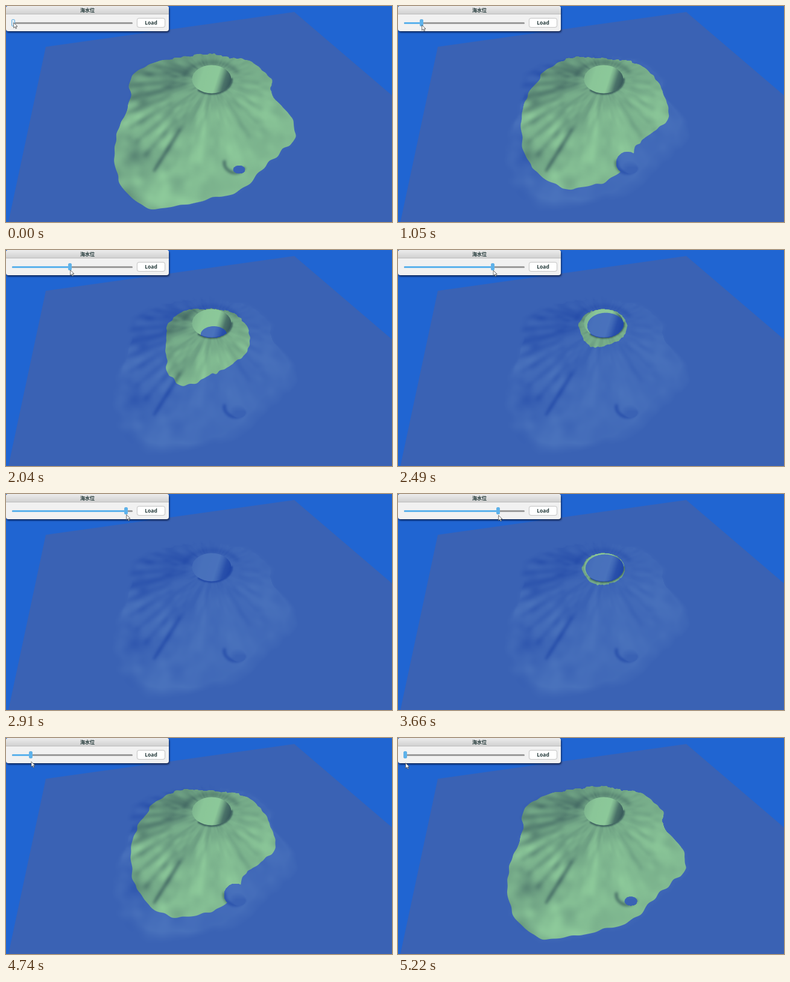
These frames come from a looping animation (640x360 px, 5.25 s). An HTML page with a canvas:

```html
<!DOCTYPE html>
<html lang="ja">
<head>
<meta charset="utf-8">
<style>
html, body { margin: 0; width: 100%; height: 100%; overflow: hidden; background: #2065d2; }
canvas, .panel, .cursor { position: absolute; left: 0; top: 0; }
.panel { width: 270px; height: 42px; border-radius: 4px; background: #f1f1f1; color: #223838;
  box-shadow: 1px 2px 3px rgba(0, 10, 40, .75); }
.title { height: 13px; border-radius: 4px 4px 0 0; border-bottom: 1px solid #bbb;
  background: linear-gradient(#ececec, #d2d2d2); text-align: center;
  font: bold 8px/14px "Noto Sans CJK JP", "Noto Sans CJK", sans-serif; }
.panel i { position: absolute; }
.track, .fill { left: 10px; top: 26.5px; height: 3px; border-radius: 2px; background: #9b9b9b; }
.track { width: 200px; }
.fill { background: #5cb2ec; }
.thumb { top: 22px; width: 6px; height: 12px; border-radius: 2px; box-sizing: border-box;
  border: 1px solid #69b3e4; }
.load { position: absolute; left: 218px; top: 21px; width: 45px; height: 14px; border-radius: 3px;
  text-align: center; background: #fff; box-shadow: 0 0 1px 1px #c4c4c4;
  font: bold 8.5px/14px "Open Sans", sans-serif; }
</style>
</head>
<body>
<canvas id="sea" width="640" height="360"></canvas>
<div class="panel">
  <div class="title">海水位</div>
  <i class="track"></i><i class="fill" id="fill"></i><i class="thumb" id="thumb"></i>
  <div class="load">Load</div>
</div>
<svg class="cursor" id="cursor" width="10" height="14">
  <path d="M.7 .8V9.5L2.8 7.6L4.2 10.8L5.6 10.1L4.2 7.1H7Z" fill="#fff" stroke="#444" stroke-width=".8"/>
</svg>
<script>
const $ = id => document.getElementById(id);
const clamp = (v, lo = 0, hi = 1) => Math.min(hi, Math.max(lo, v));
const mix = (a, b, k) => a + (b - a) * k;
const TURN = 2 * Math.PI, RAD = Math.PI / 180;

const LOOP = 5250, STEP = 30;
const WATER = [58, 98, 180], DARK = [44, 74, 82], LIGHT = [145, 207, 157];
const BOX = { x: 140, y: 70, w: 352, h: 282 };
const RIM = { x: 341, y: 122, rx: 33, ry: 24, level: 172 };   // crater edge
const PIT = { x: 380, y: 261, r: 19 };                        // small side crater

// Shore radii around the crater, evenly spaced clockwise from the right, per slider position
const shores = [
  { level: 98, radii: [57, 79, 82, 93, 127, 97, 76, 48, 27, 25, 26, 39] },
  { level: 39, radii: [86, 122, 120, 172, 195, 160, 109, 70, 42, 36, 38, 57] },
  { level: 12, radii: [97, 104, 160, 167, 171, 190, 197, 219, 240, 224, 180, 141,
    135, 105, 69, 54, 49, 44, 43, 43, 44, 50, 65, 80] }
];

function radiusAt(radii, a) {
  const n = radii.length, u = (a / TURN + 1) * n, i = Math.floor(u), f = u - i;
  const [p, q, r, s] = [-1, 0, 1, 2].map(k => radii[(i + k + n) % n]);
  return q + .5 * f * (r - p + f * (2 * p - 5 * q + 4 * r - s + f * (3 * (q - r) + s - p)));
}

// Value noise in polar coordinates, wrapping after n cells of angle
function noise(a, r, n, len) {
  const hash = (i, j) => {
    const s = Math.sin(((i + n) % n) * 127.1 + j * 311.7 + n) * 43758.5453;
    return s - Math.floor(s);
  };
  const u = (a / TURN + .5) * n, v = r / len, i = Math.floor(u), j = Math.floor(v);
  const ease = t => t * t * (3 - 2 * t), fu = ease(u - i), fv = ease(v - j);
  return mix(mix(hash(i, j), hash(i + 1, j), fu), mix(hash(i, j + 1), hash(i + 1, j + 1), fu), fv) - .5;
}

// Lowest level in a range whose pool covers the point
function poolLevel(x, y, lo, hi, pool) {
  for (let l = lo; l <= hi; l += .5) {
    const [cx, cy, rx, ry] = pool(l);
    if (Math.hypot((x - cx) / rx, (y - cy) / ry) < 1) return l;
  }
  return Infinity;
}
const craterPool = l => {
  const d = RIM.level - l;
  return [RIM.x + Math.min(d, 10) * .3, RIM.y + d * .285, RIM.rx - d * .17, RIM.ry - d * .15];
};
const pitPool = l => {
  const k = (39 - l) / 27;
  return [PIT.x + 6 * k, PIT.y + 11 * k, PIT.r - 9 * k, PIT.r - 12 * k];
};

const polar = (x, y) => ({ a: Math.atan2(y - RIM.y, x - RIM.x), r: Math.hypot(x - RIM.x, y - RIM.y) });
const inCrater = (x, y) => Math.hypot((x - RIM.x) / RIM.rx, (y - RIM.y) / RIM.ry) < 1;

function slopeHeight(x, y) {
  const { a, r } = polar(x, y);
  const rough = r + noise(a, r, 72, 14) * 7 * clamp(r / 100);
  let inner = 1 / Math.hypot(Math.cos(a) / RIM.rx, Math.sin(a) / RIM.ry), top = RIM.level;
  for (const { level, radii } of shores) {
    const outer = Math.max(radiusAt(radii, a), inner + .7);
    if (rough <= outer) return mix(top, level, (rough - inner) / (outer - inner));
    inner = outer;
    top = level;
  }
  return top - (rough - inner) * .7;
}

function heightAt(x, y) {
  if (inCrater(x, y)) return Math.min(RIM.level + 6, poolLevel(x, y, 60, RIM.level, craterPool));
  const nearPit = Math.hypot(x - PIT.x, y - PIT.y) < 24;
  return Math.min(slopeHeight(x, y), nearPit ? poolLevel(x, y, 8, 39, pitPool) : Infinity);
}

// Light and shadow of the ground, painted softly in grey
function paintShade() {
  const g = Object.assign(document.createElement("canvas"), { width: 640, height: 360 })
    .getContext("2d", { willReadFrequently: true });
  const grey = (v, a = 1) => `rgba(${v * 255},${v * 255},${v * 255},${a})`;
  const ramp = (x0, y0, x1, y1, ...stops) => {
    const f = g.createLinearGradient(x0, y0, x1, y1);
    stops.forEach(([k, v]) => f.addColorStop(k, grey(v)));
    return f;
  };
  const dab = (path, width, v, alpha, blur) => {
    g.filter = `blur(${blur}px)`;
    g.lineWidth = width;
    g.strokeStyle = grey(v, alpha);
    g.stroke(path);
  };
  const arc = (x, y, rx, ry, from, to) => {
    const p = new Path2D();
    p.ellipse(x, y, rx, ry, 0, from * RAD, to * RAD);
    return p;
  };
  // Gullies and ridges run straight down from the crater
  const streak = (deg, r0, r1, ...look) => {
    const p = new Path2D(), c = Math.cos(deg * RAD), s = Math.sin(deg * RAD);
    p.moveTo(RIM.x + c * r0, RIM.y + s * r0);
    p.lineTo(RIM.x + c * r1, RIM.y + s * r1);
    dab(p, ...look);
  };

  g.lineCap = "round";
  g.fillStyle = ramp(225, 95, 335, 225, [0, .54], [1, .83]);
  g.fillRect(0, 0, 640, 360);
  for (const deg of [98, 34, 72]) streak(deg, 60, 175, 22, .94, .5, 8);
  for (let deg = 113; deg < 160; deg += 9) streak(deg + 4, 110, 160, 9, .95, .45, 4);
  for (let deg = 122; deg < 200; deg += 9) {
    const r = 95 - (deg - 122) * .6;
    streak(deg, r, r + 78, 5, .08, .42, 3);
  }
  for (let deg = 5; deg < 65; deg += 13) streak(deg, 48, 75 + deg * .7, 4, .3, .45, 3);
  streak(122, 100, 180, 4, .05, .55, 2);
  streak(168, 45, 135, 9, .1, .4, 4);
  streak(198, 38, 78, 8, .08, .6, 4);
  dab(arc(RIM.x, RIM.y + 2, 48, 30, 195, 330), 6, .1, .5, 3);
  dab(arc(PIT.x, PIT.y, 18, 17, 35, 185), 5, .05, .7, 2);
  dab(arc(RIM.x, RIM.y, RIM.rx, RIM.ry, 0, 130), 4, .05, .8, 1);

  g.filter = "none";
  g.fillStyle = ramp(309, 112, 373, 132, [0, .78], [.25, .93], [.62, .95], [.7, .75], [.82, .3], [1, .08]);
  g.fill(arc(RIM.x, RIM.y, RIM.rx - .5, RIM.ry - .5, 0, 360));
  return g.getImageData(BOX.x, BOX.y, BOX.w, BOX.h).data;
}

const sea = $("sea").getContext("2d");
sea.fillStyle = "#2065d2";
sea.fillRect(0, 0, 640, 360);
sea.fillStyle = `rgb(${WATER})`;
sea.fill(new Path2D("M66 68L478 10L640 149V360H4Z"));

const { w, h } = BOX, size = w * h, shade = paintShade();
const height = new Float32Array(size), soft = new Float32Array(size).fill(1);
const land = new Float32Array(size * 3), sunk = new Float32Array(size * 3);
for (let i = 0; i < size; i++) {
  const x = BOX.x + i % w, y = BOX.y + Math.floor(i / w);
  height[i] = heightAt(x, y);
  let v = shade[i * 4] / 255;
  if (!inCrater(x, y)) {
    const { a, r } = polar(x, y);
    v += (noise(a, r, 40, 30) + noise(a, r, 80, 15) * .7) * mix(.12, .38, clamp((330 - x) / 140));
  }
  v = clamp(v);
  const seen = clamp((height[i] - 8) / 14);
  for (let c = 0; c < 3; c++) {
    land[i * 3 + c] = mix(DARK[c], LIGHT[c], v);
    sunk[i * 3 + c] = WATER[c] + (v - .65) * [50, 52, 26][c] * seen;
  }
  if (i >= w) soft[i] = clamp(Math.hypot(height[i] - height[i - 1], height[i] - height[i - w]), .5, 2.5);
}

const image = sea.createImageData(w, h);
image.data.fill(255);
function drawSea(level) {
  for (let i = 0; i < size; i++) {
    const dry = clamp((height[i] - level) / soft[i] + .5);
    for (let c = 0; c < 3; c++) image.data[i * 4 + c] = mix(sunk[i * 3 + c], land[i * 3 + c], dry);
  }
  sea.putImageData(image, BOX.x, BOX.y);
}

// Smooth curve through [time, value] keys without overshoot
function along(keys, t) {
  const slope = i => keys[i + 1] && keys[i] ? (keys[i + 1][1] - keys[i][1]) / (keys[i + 1][0] - keys[i][0]) : 0;
  const tangent = i => {
    const a = slope(i - 1), b = slope(i);
    return a * b > 0 ? 2 * a * b / (a + b) : 0;
  };
  const j = keys.findIndex(k => k[0] > t);
  if (j < 0) return keys[keys.length - 1][1];
  const i = j - 1, d = keys[j][0] - keys[i][0], k = (t - keys[i][0]) / d, m = 1 - k;
  return keys[i][1] * (1 + 2 * k) * m * m + keys[j][1] * k * k * (3 - 2 * k)
    + d * k * m * (tangent(i) * m - tangent(j) * k);
}
const slide = [[0, 12], [1050, 39], [2040, 106], [2910, 199], [3120, 207], [3660, 166], [4290, 90.5], [5220, 12]];
const hand = [[0, 27], [1050, 31], [4290, 36], [5220, 41]];

const start = performance.now();
function frame() {
  const t = Math.floor((performance.now() - start) % LOOP / STEP) * STEP, x = along(slide, t);
  drawSea(x + 1.8 * t / LOOP);   // the sea lags a little behind the thumb
  $("fill").style.width = Math.max(0, x - 12) + "px";
  $("thumb").style.left = x - 3 + "px";
  $("thumb").style.background = t < 300 ? "#dceaf4" : "#5cb2ec";
  $("cursor").style.transform = `translate(${x}px, ${along(hand, t)}px)`;
  requestAnimationFrame(frame);
}
frame();
</script>
</body>
</html>
```
